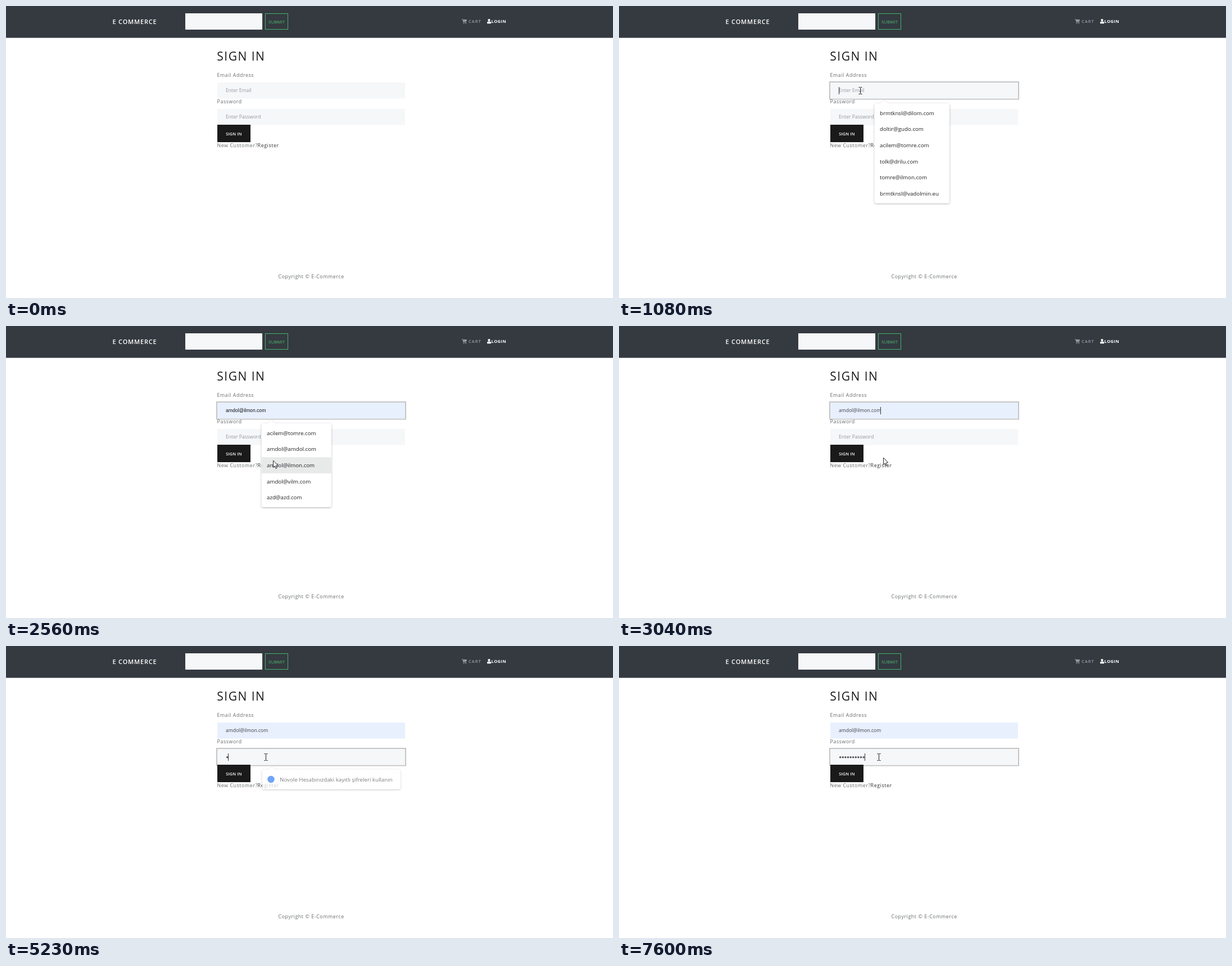
Animation, 1080 px wide and 519 px high, one loop 8 s. Source, as an HTML page with a canvas:

```html
<!DOCTYPE html>
<html lang="en">
<head>
<meta charset="utf-8">
<title>Sign in</title>
<style>
html, body { margin: 0; width: 100%; height: 100%; overflow: hidden; background: #fff; }
canvas { display: block; width: 100vw; height: 100vh; }
</style>
</head>
<body>
<canvas id="stage" width="1080" height="519"></canvas>
<script>
const ctx = document.getElementById('stage').getContext('2d');
const LOOP = 8000;
const SANS = '"Open Sans", "Noto Sans", sans-serif';
const ARIAL = '"Liberation Sans", Arial, sans-serif';

const FIELD = { x: 376, w: 334, h: 28.5 };
const EMAIL_Y = 136, PASS_Y = 183;
const FOCUS_EMAIL = 940, OPEN_LIST = 1010, TYPE_A = 1470, PICK = 2830;
const FOCUS_PASS = 3850, FIRST_KEY = 5230;
const KEYS = [FIRST_KEY, 5430, 5700, 5970, 6100, 6610, 6940, 7140, 7340, 7600];
const CLICKS = [[940, 1075], [2830, 2970], [3740, 3950]];
const ROW_Y = 176, ROW_H = 28.6;

const ALL = ['brmtknsl@dilom.com', 'doltir@gudo.com', 'acilem@tomre.com',
  'tolk@drilu.com', 'tomre@ilmon.com', 'brmtknsl@vadolmin.eu'];
const MATCHES = ['acilem@tomre.com', 'amdol@amdol.com', 'amdol@ilmon.com',
  'amdol@vilm.com', 'azd@azd.com'];

// time, x, y
const PATH = [
  [70, 985, 505], [730, 429, 150], [2000, 429, 150], [2210, 478, 202],
  [2450, 477, 236], [2700, 472, 243], [2830, 472, 243], [3040, 470, 234], [3610, 462, 197]
];

const clamp = v => Math.max(0, Math.min(1, v));
const lerp = (a, b, u) => a + (b - a) * u;

function rect(x, y, w, h, color) {
  ctx.fillStyle = color;
  ctx.fillRect(x, y, w, h);
}

function text(str, x, y, size, color, { weight = 400, gap = 0, family = SANS } = {}) {
  ctx.font = `${weight} ${size}px ${family}`;
  ctx.letterSpacing = gap + 'px';
  ctx.fillStyle = color;
  ctx.fillText(str, x, y);
}

function disc(x, y, r, color) {
  ctx.fillStyle = color;
  ctx.beginPath();
  ctx.arc(x, y, r, 0, Math.PI * 2);
  ctx.fill();
}

function poly(points, fill, stroke) {
  ctx.beginPath();
  points.forEach(([x, y]) => ctx.lineTo(x, y));
  ctx.closePath();
  if (fill) { ctx.fillStyle = fill; ctx.fill(); }
  if (stroke) { ctx.strokeStyle = stroke; ctx.lineWidth = 1; ctx.stroke(); }
}

function cartIcon(x, y, color) {
  ctx.strokeStyle = color;
  ctx.lineWidth = 1;
  ctx.beginPath();
  ctx.moveTo(x, y + 0.6);
  ctx.lineTo(x + 1.7, y + 0.6);
  ctx.lineTo(x + 3, y + 6);
  ctx.lineTo(x + 8, y + 6);
  ctx.stroke();
  poly([[x + 1.9, y + 1.1], [x + 9, y + 1.1], [x + 8, y + 4.8], [x + 2.7, y + 4.8]], color);
  disc(x + 3.5, y + 7.4, 0.9, color);
  disc(x + 7.3, y + 7.4, 0.9, color);
}

function userIcon(x, y, color) {
  disc(x + 3.5, y + 2.1, 2.1, color);
  ctx.beginPath();
  ctx.roundRect(x, y + 4.6, 7.2, 3.6, [2.2, 2.2, 0.7, 0.7]);
  ctx.fill();
}

function header() {
  rect(0, 0, 1080, 56.6, '#343a40');
  text('E COMMERCE', 189.5, 32, 11, '#fff', { weight: 600, gap: 0.8 });
  rect(319, 13, 137, 29, '#f6f7f9');
  ctx.strokeStyle = '#47b36d';
  ctx.lineWidth = 1;
  ctx.strokeRect(461.5, 13.5, 40, 28);
  text('SUBMIT', 467, 31, 7.8, '#4bbf73', { gap: 0.1 });
  cartIcon(811, 23, '#999da0');
  text('CART', 823, 30.3, 7.6, '#999da0', { weight: 600, gap: 0.9 });
  userIcon(856, 23, '#fff');
  text('LOGIN', 863.6, 30.3, 7.6, '#fff', { weight: 700, gap: 0.4 });
}

function labels() {
  const body = { gap: 0.6 }, grey = '#666a6d';
  text('SIGN IN', 375.3, 96.6, 21, '#1a1a1a', { weight: 500, gap: 1.5 });
  text('Email Address', 375.5, 126.4, 8.8, grey, body);
  text('Password', 375.5, 173.4, 8.8, grey, body);
  rect(376, 211, 59, 31, '#1a1a1a');
  text('SIGN IN', 391.2, 229.6, 7.4, '#fff', { weight: 600, gap: 0.15 });
  text('New Customer?', 375.5, 251, 8.8, grey, body);
  text('Register', 447.6, 251, 8.8, '#333', body);
  text('Copyright © E-Commerce', 484.5, 484, 8.8, grey, body);
}

function field(y, focus, color) {
  const s = 2 * focus;
  if (s > 0) {
    rect(FIELD.x - s, y - s, FIELD.w + 2 * s, FIELD.h + 2 * s, `rgba(26,26,26,${0.25 * focus})`);
    rect(FIELD.x, y, FIELD.w, FIELD.h, '#fff');
  }
  rect(FIELD.x, y, FIELD.w, FIELD.h, color);
}

function caret(x, y, since, t) {
  const on = t >= since && Math.floor((t - since) / 525) % 2 === 0;
  if (on) rect(Math.floor(x), y, 1, 13, '#333');
}

function hoverRow(t, p) {
  if (!p || t < 2000 || p.y < ROW_Y) return -1;
  return Math.floor((p.y - ROW_Y) / ROW_H);
}

function emailField(t, row) {
  const focus = t < FOCUS_PASS ? clamp((t - FOCUS_EMAIL) / 130) : 1 - clamp((t - FOCUS_PASS) / 150);
  const picked = t >= PICK, preview = !picked && row >= 0;
  field(EMAIL_Y, focus, picked || preview ? '#e8f0fe' : '#f6f7f9');
  const x = 391, y = 153.3;
  if (picked) {
    text(MATCHES[2], x, y, 8.55, '#3c4043');
    if (t < FOCUS_PASS) caret(465, 144, PICK, t);
  } else if (preview) {
    text(MATCHES[row], x, y, 8.6, '#111', { family: ARIAL });
  } else if (t >= TYPE_A) {
    text('a', x, y, 8.6, '#55595c');
    caret(396, 144, TYPE_A, t);
  } else {
    text('Enter Email', x, y, 8.65, '#919aa1');
    caret(391, 144, FOCUS_EMAIL, t);
  }
}

function passField(t) {
  field(PASS_Y, clamp((t - FOCUS_PASS) / 150), '#f6f7f9');
  const n = KEYS.filter(k => t >= k).length, step = 4.6;
  if (!n) text('Enter Password', 391, 200.3, 8.65, '#919aa1');
  for (let i = 0; i < n; i++) disc(393.7 + i * step, 197.8, 1.75, '#55595c');
  caret(391 + n * step, 191, n ? KEYS[n - 1] : FOCUS_PASS, t);
}

// Shadow kept outside the box, so a fading box stays white
function softBox(x, y, w, h) {
  const box = new Path2D(), outside = new Path2D();
  box.roundRect(x, y, w, h, 3);
  outside.rect(x - 10, y - 10, w + 20, h + 20);
  outside.addPath(box);
  ctx.fillStyle = '#fff';
  ctx.save();
  ctx.clip(outside, 'evenodd');
  ctx.shadowColor = 'rgba(0,0,0,.32)';
  ctx.shadowBlur = 3.5;
  ctx.shadowOffsetY = 1;
  ctx.fill(box);
  ctx.restore();
  ctx.fill(box);
}

// White bubble with a notch; fades and shrinks a little when it closes
function bubble(y, w, h, alpha, content) {
  if (alpha <= 0) return;
  const x = 454.7, cx = x + w / 2, cy = y + h / 2, k = 1 - (1 - alpha) * 0.035;
  ctx.save();
  ctx.globalAlpha = alpha;
  ctx.translate(cx, cy);
  ctx.scale(k, k);
  ctx.translate(-cx, -cy);
  softBox(x, y, w, h);
  poly([[464.5, y + 0.5], [472, y - 6.5], [479.5, y + 0.5]], '#fff');
  ctx.strokeStyle = '#e2e2e2';
  ctx.lineWidth = 0.8;
  ctx.beginPath();
  ctx.moveTo(464.5, y);
  ctx.lineTo(472, y - 6.5);
  ctx.lineTo(479.5, y);
  ctx.stroke();
  content(x);
  ctx.restore();
}

function closing(t, start) {
  return t < start ? 1 : clamp(0.75 - Math.floor((t - start) / 67) * 0.27);
}

function emailList(t, row) {
  if (t < OPEN_LIST) return;
  const items = t < TYPE_A ? ALL : MATCHES;
  const w = t < TYPE_A ? 133.3 : 124;
  bubble(173, w, items.length * ROW_H + 6, closing(t, PICK), x => {
    if (row >= 0) rect(x, ROW_Y + row * ROW_H, w, ROW_H, '#e8e9e9');
    items.forEach((s, i) => text(s, 464, ROW_Y + 17.7 + i * ROW_H, 9.7, '#1f2123'));
  });
}

function passHint(t) {
  if (t < FOCUS_PASS) return;
  bubble(219.7, 248, 35, closing(t, FIRST_KEY), () => {
    disc(470.5, 237, 6.3, '#4285f4');
    text('Novole Hesabınızdaki kayıtlı şifreleri kullanın', 486.3, 240.7, 9.8, '#505357');
  });
}

function pointer(t) {
  if (t < PATH[0][0]) return null;
  const i = PATH.findIndex(k => k[0] > t);
  if (i < 0) {
    const [, x, y] = PATH[PATH.length - 1];
    return { x, y };
  }
  const [t0, x0, y0] = PATH[i - 1], [t1, x1, y1] = PATH[i];
  const u = Math.floor((t - t0) / 70) * 70 / (t1 - t0);
  const e = 1 - (1 - u) ** 1.7;
  return { x: Math.round(lerp(x0, x1, e)), y: Math.round(lerp(y0, y1, e)) };
}

function inField(p, y) {
  return p.x > FIELD.x && p.x < FIELD.x + FIELD.w && p.y > y && p.y < y + FIELD.h;
}

function drawPointer(t, p) {
  if (!p) return;
  if (CLICKS.some(([a, b]) => t >= a && t < b)) disc(p.x - 0.5, p.y, 9.3, 'rgba(255,236,0,.7)');
  const listOpen = t >= OPEN_LIST && t < PICK;
  const beam = inField(p, EMAIL_Y) || (!listOpen && inField(p, PASS_Y));
  ctx.save();
  ctx.translate(p.x, p.y);
  if (beam) {
    rect(0, -5, 1, 11, '#222');
    for (const y of [-6, 6]) {
      rect(-2.5, y, 2.5, 1, '#222');
      rect(1, y, 2.5, 1, '#222');
    }
  } else {
    poly([[0.5, 0], [0.5, 12.4], [3.2, 9.9], [5.2, 14.5], [7, 13.7], [5.1, 9.2], [8.8, 8.9]], '#fff', '#2b2b33');
  }
  ctx.restore();
}

function draw(t) {
  rect(0, 0, 1080, 519, '#fff');
  const p = pointer(t);
  const row = t < PICK ? hoverRow(t, p) : 2;
  header();
  emailField(t, row);
  passField(t);
  labels();
  emailList(t, row);
  passHint(t);
  drawPointer(t, p);
}

const start = performance.now();
function frame() {
  draw((performance.now() - start) % LOOP);
  requestAnimationFrame(frame);
}
frame();
</script>
</body>
</html>
```
